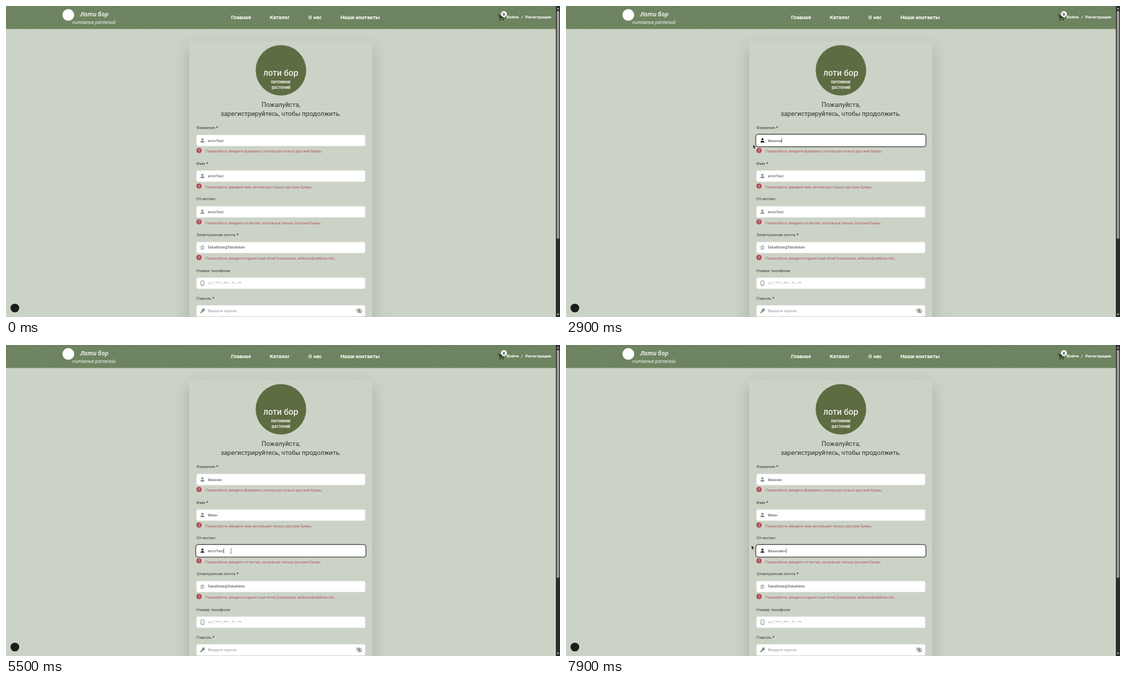
Recreate the animation shown at these times as an HTML page with a canvas. Size 800 by 450 pixels, loop 8000 ms.

```html
<!DOCTYPE html>
<html lang="ru">
<head>
<meta charset="utf-8">
<title>Регистрация</title>
<style>
html, body { margin: 0; width: 100%; height: 100%; overflow: hidden; background: #cbd3c7; }
canvas { display: block; width: 800px; height: 450px; }
</style>
</head>
<body>
<canvas id="stage"></canvas>
<script>
const canvas = document.getElementById('stage');
const ctx = canvas.getContext('2d');
const ratio = window.devicePixelRatio || 1;
canvas.width = 800 * ratio;
canvas.height = 450 * ratio;

const LOOP = 8000, STEP = 100;
const TEXT_X = 291.5, INPUT_FONT = '5.6px Roboto, sans-serif';
const WRONG = 'errorTest';
const PLEASE = 'Пожалуйста, введите ';

const fields = [
  { y: 186.5, label: 'Фамилия', need: true, icon: 'user', text: WRONG,
    error: PLEASE + 'фамилию, используя только русские буквы',
    focus: 900, blur: 3500, drag: 1100, typed: 'Иванов', keys: [1800, 1900, 2200, 2400, 2550, 2700] },
  { y: 238, label: 'Имя', need: true, icon: 'user', text: WRONG,
    error: PLEASE + 'имя, используя только русские буквы',
    focus: 3500, blur: 5500, drag: 3700, typed: 'Иван', keys: [4400, 4600, 4700, 4900] },
  { y: 289.7, label: 'Отчество', icon: 'user', text: WRONG,
    error: PLEASE + 'отчество, используя только русские буквы',
    focus: 5500, blur: LOOP, drag: 5600, typed: 'Иванович',
    keys: [6600, 6700, 6800, 7000, 7200, 7400, 7600, 7700] },
  { y: 341.4, label: 'Электронная почта', need: true, icon: 'at', text: 'falseNote@falseNote',
    error: PLEASE + 'корректный email (например, address@address.tld).' },
  { y: 393, label: 'Номер телефона', icon: 'phone', hint: '+7 ( *** ) *** - ** - **' },
  { y: 433, label: 'Пароль', need: true, icon: 'key', hint: 'Введите пароль', eye: true }
];

// Pointer stops: time, x, y
const pointerPath = [
  [500, 796, 150], [850, 329.7, 195], [1100, 329.7, 195], [1600, 267.8, 198],
  [2400, 267.8, 198], [2800, 270.3, 200.5], [3100, 270.3, 200.5], [3400, 325, 247],
  [3700, 325, 247], [4200, 274.7, 240.7], [5200, 274.7, 240.7], [5450, 325, 298],
  [5600, 325, 298], [6000, 268, 290], [LOOP, 268, 290]
];

function makeSpecks() {
  const path = new Path2D();
  let seed = 7;
  const random = () => (seed = seed * 16807 % 2147483647) / 2147483647;
  for (let i = 0; i < 1500; i++) {
    const x = random() * 794, y = random() * 32, angle = random() * Math.PI;
    path.moveTo(x, y);
    path.lineTo(x + 2 * Math.cos(angle), y + 2 * Math.sin(angle));
  }
  return path;
}
const specks = makeSpecks();

function text(value, x, y, font, color, align = 'left') {
  ctx.font = font;
  ctx.fillStyle = color;
  ctx.textAlign = align;
  ctx.fillText(value, x, y);
}

function disc(x, y, r, color) {
  ctx.fillStyle = color;
  ctx.beginPath();
  ctx.arc(x, y, r, 0, Math.PI * 2);
  ctx.fill();
}

function box(x, y, w, h, r, fill, stroke, line = 1) {
  ctx.beginPath();
  ctx.roundRect(x, y, w, h, r);
  if (fill) { ctx.fillStyle = fill; ctx.fill(); }
  if (stroke) { ctx.strokeStyle = stroke; ctx.lineWidth = line; ctx.stroke(); }
}

function poly(points, fill, stroke, line = 1) {
  ctx.beginPath();
  points.forEach(([x, y]) => ctx.lineTo(x, y));
  if (fill) { ctx.closePath(); ctx.fillStyle = fill; ctx.fill(); }
  if (stroke) { ctx.strokeStyle = stroke; ctx.lineWidth = line; ctx.stroke(); }
}

function header() {
  ctx.fillStyle = '#6f8561';
  ctx.fillRect(0, 0, 794, 33.3);
  ctx.strokeStyle = 'rgba(65, 87, 50, 0.15)';
  ctx.lineWidth = 0.6;
  ctx.stroke(specks);

  disc(90, 13, 8.5, '#fff');
  text('Лоти бор', 107, 14.5, 'italic 600 8.7px "Open Sans", sans-serif', '#fff');
  text('питомник растений', 96, 25.8, 'italic 6.3px "Open Sans", sans-serif', '#fff');

  const nav = 'bold 7.6px Roboto, sans-serif';
  text('Главная', 325, 19.3, nav, '#fff');
  text('Каталог', 381, 19.3, nav, '#fff');
  text('О нас', 436.5, 19.3, nav, '#fff');
  text('Наши контакты', 483, 19.3, nav, '#fff');

  const small = 'bold 6.2px Roboto, sans-serif';
  text('Войти', 723, 18.4, small, '#fff');
  text('/', 744, 18.4, small, '#fff');
  text('Регистрация', 750, 18.4, small, '#fff');

  poly([[710, 12.7], [711.7, 12.7], [713, 18.2], [718.5, 18.2]], null, '#263020', 0.9);
  poly([[712, 13.5], [719.5, 13.5], [718.5, 17], [712.8, 17]], '#354128');
  disc(713.6, 20, 0.9, '#263020');
  disc(717.8, 20, 0.9, '#263020');
  disc(719, 11.8, 4.3, '#fff');
  text('0', 719, 14, 'bold 6px Roboto, sans-serif', '#222', 'center');
}

function scrollbar() {
  ctx.fillStyle = '#2c2c2c';
  ctx.fillRect(794, 0, 6, 450);
  box(795.3, 7, 3.6, 330, 1.8, '#9f9f9f');
  poly([[797, 2], [799, 5], [795, 5]], '#9f9f9f');
  poly([[797, 448], [799, 445], [795, 445]], '#9f9f9f');
}

function panel() {
  ctx.save();
  ctx.shadowColor = 'rgba(45, 60, 45, 0.24)';
  ctx.shadowBlur = 21 * ratio;
  ctx.shadowOffsetY = 10 * ratio;
  box(264.5, 50.5, 264.5, 420, 4, '#cbd3c7');
  ctx.restore();

  disc(397, 93, 36.5, '#5e6c43');
  text('лоти бор', 397, 101, '500 11.5px Inter, sans-serif', '#fff', 'center');
  const sub = '600 5.8px Inter, sans-serif';
  text('питомник', 397, 112.3, sub, '#fff', 'center');
  text('растений', 397, 119.8, sub, '#fff', 'center');

  const title = '9.4px Roboto, sans-serif';
  text('Пожалуйста,', 397, 146, title, '#30332f', 'center');
  text('зарегистрируйтесь, чтобы продолжить.', 397, 159.4, title, '#30332f', 'center');
}

const icons = {
  user(y, color) {
    disc(283.7, y - 1.8, 1.5, color);
    ctx.beginPath();
    ctx.ellipse(283.7, y + 2.8, 2.8, 2.3, 0, Math.PI, 0);
    ctx.fill();
  },
  at(y, color) {
    text('@', 283.7, y + 2.2, '7.6px Roboto, sans-serif', color, 'center');
  },
  phone(y, color) {
    box(281.5, y - 3.4, 4.4, 6.8, 0.9, null, color, 0.8);
    ctx.fillStyle = color;
    ctx.fillRect(282.8, y + 2, 1.8, 0.6);
  },
  key(y, color) {
    disc(285.2, y - 1.4, 2.1, color);
    poly([[285, y - 1], [281, y + 3]], null, color, 1.7);
    disc(285.9, y - 2, 0.7, '#fff');
  }
};

function eye(x, y) {
  ctx.beginPath();
  ctx.moveTo(x - 4, y);
  ctx.quadraticCurveTo(x, y - 5.5, x + 4, y);
  ctx.quadraticCurveTo(x, y + 5.5, x - 4, y);
  ctx.strokeStyle = '#6f6f6f';
  ctx.lineWidth = 0.9;
  ctx.stroke();
  disc(x, y, 1.5, '#6f6f6f');
  poly([[x - 3.6, y - 3], [x + 3.6, y + 3]], null, '#6f6f6f', 0.9);
}

function selection(value, pointerX, y) {
  const edge = count => TEXT_X + ctx.measureText(value.slice(0, count)).width;
  let start = 0;
  while (start < value.length && edge(start) < pointerX) start++;
  const left = edge(start), right = edge(value.length);
  if (right <= left) return;
  ctx.save();
  ctx.beginPath();
  ctx.rect(left, y + 3.9, right - left, 8.4);
  ctx.clip();
  ctx.fillStyle = '#2763cc';
  ctx.fill();
  text(value, TEXT_X, y + 10, INPUT_FONT, '#fff');
  ctx.restore();
}

function drawField(field, t, pointer) {
  const { y } = field;
  const focused = t >= field.focus && t < field.blur;
  const mid = y + 8.1;

  const labelFont = '6.2px Roboto, sans-serif';
  text(field.label, 275, y - 8.4, labelFont, '#3a3e39');
  if (field.need) {
    const end = 275 + ctx.measureText(field.label + ' ').width;
    text('*', end, y - 8.4, 'bold ' + labelFont, '#222');
  }

  // The focus ring is a thin dark line with a white gap inside
  if (focused) box(274, y - 1, 245.8, 18.2, 3.4, '#fff', '#1c1f1c', 0.9);
  else box(275, y, 243.8, 16.2, 2.5, '#fff', '#dce0da', 0.5);
  icons[field.icon](mid, focused ? '#111' : '#808080');
  if (field.eye) eye(510, mid);

  const count = field.keys ? field.keys.filter(k => k <= t).length : 0;
  const value = count ? field.typed.slice(0, count) : field.text;
  text(value || field.hint, TEXT_X, y + 10, INPUT_FONT, value ? '#4a4a4a' : '#9b9b9b');

  if (focused) {
    const dragging = t > field.drag && !count;
    const lastInput = count ? field.keys[count - 1] : field.focus;
    if (dragging) {
      selection(value, pointer.x, y);
    } else if ((t - lastInput) % 1000 < 500) {
      const caret = TEXT_X + ctx.measureText(value).width + 0.2;
      ctx.fillStyle = '#111';
      ctx.fillRect(caret, y + 4.5, 0.5, 7.2);
    }
  }

  if (field.error) {
    disc(278.7, y + 22.5, 3.8, '#b34b55');
    text('!', 278.7, y + 24.6, 'bold 6px Roboto, sans-serif', '#e8dcd8', 'center');
    text(field.error, 288, y + 25.8, '5.46px Roboto, sans-serif', '#b2585f');
  }
}

function pointerAt(t) {
  const next = pointerPath.findIndex(stop => stop[0] > t);
  if (next < 1) return { x: 900, y: 150 };
  const [t0, x0, y0] = pointerPath[next - 1];
  const [t1, x1, y1] = pointerPath[next];
  const p = (t - t0) / (t1 - t0);
  const ease = p * p * (3 - 2 * p);
  return { x: x0 + (x1 - x0) * ease, y: y0 + (y1 - y0) * ease };
}

function drawPointer({ x, y }) {
  const overInput = x > 276 && x < 519 && fields.some(f => y > f.y && y < f.y + 16.2);
  if (overInput) {
    ctx.fillStyle = '#444';
    ctx.fillRect(x - 0.25, y - 3, 0.5, 6.4);
    ctx.fillRect(x - 1.3, y - 3.3, 2.6, 0.5);
    ctx.fillRect(x - 1.3, y + 3.1, 2.6, 0.5);
    return;
  }
  const shape = [[0, 0], [0, 5.6], [1.2, 4.5], [2, 6.4], [3, 6], [2.2, 4.1], [3.8, 4], [0, 0]];
  poly(shape.map(([dx, dy]) => [x + dx, y + dy]), '#111', '#e9ece7', 0.3);
}

function frame(now) {
  const t = Math.floor((now % LOOP) / STEP) * STEP;
  const pointer = pointerAt(t);
  ctx.setTransform(ratio, 0, 0, ratio, 0, 0);
  ctx.fillStyle = '#cbd3c7';
  ctx.fillRect(0, 0, 800, 450);
  panel();
  header();
  fields.forEach(field => drawField(field, t, pointer));
  disc(12.8, 437, 6.3, '#1b1d1b');
  drawPointer(pointer);
  scrollbar();
  requestAnimationFrame(frame);
}
requestAnimationFrame(frame);
</script>
</body>
</html>
```
